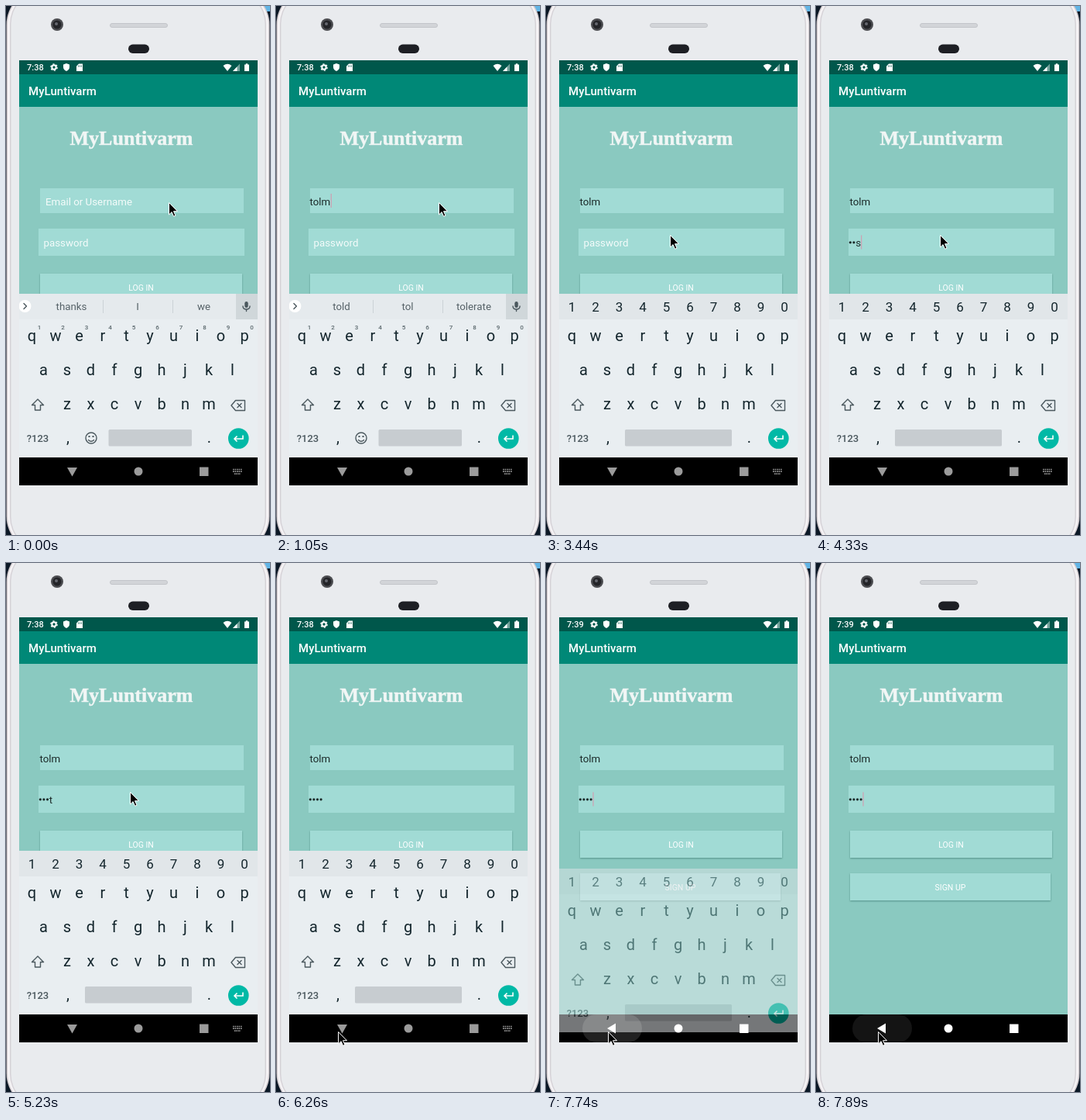
Recreate the animation shown at these times as an HTML page. Size 341 px wide and 682 px high, loop 8000 ms.

```html
<!DOCTYPE html>
<html lang="en">
<head>
<meta charset="utf-8">
<title>Login screen</title>
<style>
  html, body { margin: 0; width: 100%; height: 100%; overflow: hidden; background: #0b1826; }
  svg { display: block; width: 100%; height: 100%; font-family: Roboto, sans-serif; }
  .mid { text-anchor: middle; }
  .hint { font-size: 13.3px; fill: #f4fbfa; }
  .typed { font-size: 13.3px; fill: #1c2b2a; }
  .field { fill: #a1dbd5; }
  .button { fill: #a1dbd5; filter: drop-shadow(0 1px .8px rgba(0, 60, 50, .38)); }
  .label { font-size: 10.5px; fill: #fff; text-anchor: middle; }
  .caret { fill: #cf9fb1; }
  .key { font-size: 20px; fill: #14262d; }
  .digit { font-size: 17px; fill: #14262d; }
  .tiny { font-size: 8px; font-weight: 500; fill: #5b686d; }
  .word { font-size: 13.3px; fill: #566268; }
  .line { fill: none; stroke: #4b585e; stroke-width: 1.4; stroke-linejoin: round; stroke-linecap: round; }
</style>
</head>
<body>
<svg viewBox="0 0 341 682" preserveAspectRatio="none">
  <defs>
    <clipPath id="screenClip"><rect x="17" y="70" width="308" height="548"/></clipPath>
    <clipPath id="navClip"><rect x="17" y="582" width="308" height="36"/></clipPath>
  </defs>

  <!-- phone body -->
  <rect width="341" height="682" fill="#0b1826"/>
  <rect x="333" width="8" height="7" fill="#62b5e6"/>
  <rect x=".5" y="-22" width="340" height="726" rx="46" fill="#cfc8cc"/>
  <rect x="2" y="-21" width="337" height="724" rx="45" fill="#f5f3f5"/>
  <rect x="5" y="-19" width="331" height="720" rx="42" fill="#d5d2d7"/>
  <rect x="6.5" y="-18" width="328" height="718" rx="41" fill="#e9ebee"/>
  <circle cx="66" cy="24" r="8" fill="#4b4c50"/>
  <circle cx="66" cy="24" r="5.5" fill="#232428"/>
  <circle cx="65" cy="23" r="2" fill="#65676e"/>
  <rect x="134.5" y="22.5" width="74" height="5" rx="2.5" fill="#d2d4d8" stroke="#c3c5ca"/>
  <rect x="158" y="49.500" width="27" height="11.500" rx="5.700" fill="#1d1f24"/>

  <g clip-path="url(#screenClip)">
    <rect x="17" y="70" width="308" height="548" fill="#8ac9c0"/>
    <rect x="17" y="70" width="308" height="18" fill="#00574b"/>
    <rect x="17" y="88" width="308" height="42" fill="#008877"/>

    <!-- status bar -->
    <g fill="#fff">
      <text id="clock" x="27" y="83" font-size="11" font-weight="500"></text>
      <circle cx="62" cy="79" r="2.700" fill="none" stroke="#fff" stroke-width="2"/>
      <circle cx="62" cy="79" r="4.200" fill="none" stroke="#fff" stroke-width="1.300" stroke-dasharray="2.200"/>
      <path d="M78 74l4 1.600v3.200q0 3.600-4 5.200q-4-1.600-4-5.200v-3.200z"/>
      <path d="M94 74.500h5v9.500h-8v-6.500z"/>
      <path d="M93.500 76.500v2m2-2v2m2-2v2" stroke="#00574b" stroke-width=".8"/>
      <path d="M286 84l-5.500-7q5.500-4.600 11 0z"/>
      <path d="M302 74.500v9.500h-9z" opacity=".45"/>
      <path d="M298.500 78.200v5.800h-5.500z"/>
      <path d="M309.800 74.300h2.400v1.200h1.800v8.500h-6v-8.500h1.800z"/>
    </g>

    <!-- login form -->
    <text x="29" y="115" font-size="15" font-weight="500" fill="#fff">MyLuntivarm</text>
    <text class="mid" x="162" y="179" font-family="'Liberation Serif', serif" font-size="26" font-weight="700"
      fill="#f1f6f5" stroke="#f1f6f5" stroke-width=".5">MyLuntivarm</text>
    <rect class="field" x="44" y="235" width="263" height="32"/>
    <rect class="field" x="42" y="287" width="266" height="35"/>
    <rect class="button" x="44" y="345" width="261" height="35"/>
    <rect class="button" x="44" y="400" width="259" height="35"/>
    <text class="label" x="174.500" y="366.500">LOG IN</text>
    <text class="label" x="173.500" y="421.800">SIGN UP</text>
    <text id="userHint" class="hint" x="51" y="256.500">Email or Username</text>
    <text id="user" class="typed" x="43.500" y="256.500"></text>
    <text id="passHint" class="hint" x="48.500" y="309.800">password</text>
    <g id="dots" fill="#1c2b2a"></g>
    <text id="pass" class="typed" y="309.800"></text>
    <rect id="caret" class="caret" width="1.200" height="18"/>

    <rect x="17" y="582" width="308" height="36" fill="#000"/>

    <g id="keyboard">
      <rect x="17" y="371" width="308" height="211" fill="#e9eef1"/>
      <rect x="17" y="371" width="308" height="33" fill="#e1e6e9"/>
      <g id="keys"></g>
      <g id="suggestRow">
        <rect x="17" y="371" width="308" height="33" fill="#e5eaed"/>
        <rect x="297" y="371" width="28" height="33" fill="#d0d7da"/>
        <path d="M125.500 379v17m90-17v17" stroke="#cbd2d6"/>
        <circle cx="24.500" cy="387" r="8" fill="#fff"/>
        <path class="line" d="M23 383.500l3.500 3.500l-3.500 3.500"/>
        <rect x="308.300" y="381" width="4.400" height="8" rx="2.200" fill="#4b585e"/>
        <path class="line" d="M306 387q0 4 4.500 4q4.500 0 4.500-4m-4.500 4v2.500"/>
        <text class="word mid" x="84.500" y="392"></text>
        <text class="word mid" x="170" y="392"></text>
        <text class="word mid" x="255.500" y="392"></text>
      </g>
      <path class="line" d="M41 507l7.500 7.500h-4v6.500h-7v-6.500h-4z"/>
      <path class="line" d="M296.500 508.500h12v13h-12l-5.500-6.500zm2.500 4l5 5m0-5l-5 5"/>
      <text class="mid" x="41" y="562" font-size="13" font-weight="500" fill="#4b585e">?123</text>
      <text class="key mid" x="80" y="563">,</text>
      <text class="key mid" x="262.500" y="563">.</text>
      <g id="emoji">
        <circle class="line" cx="110" cy="557" r="7"/>
        <path class="line" d="M106.500 559.500q3.500 3.500 7 0"/>
        <path d="M106.500 554h2v2h-2zm5 0h2v2h-2z" fill="#4b585e"/>
      </g>
      <rect id="space" y="546" height="21.500" rx="1.500" fill="#c7ccd0"/>
      <circle cx="300.300" cy="557.500" r="13.300" fill="#00b9a6"/>
      <path d="M306 553.500v4.500h-11m3.500-3.500l-3.500 3.500l3.500 3.500" fill="none" stroke="#fff" stroke-width="1.600"/>
    </g>

    <!-- navigation bar -->
    <g clip-path="url(#navClip)"><rect id="ripple" y="582" height="36" rx="18" fill="#fff"/></g>
    <g id="nav">
      <path id="back"/>
      <circle cx="171" cy="600" r="5.500"/>
      <rect x="250" y="594.500" width="11.500" height="11.500"/>
      <path id="switcher" fill="none" stroke="#9b9b9b" stroke-width="1.600" stroke-dasharray="1.600 .9"
        d="M293 597.500h12m-12 2.600h12m-10 3h8"/>
    </g>
  </g>

  <path id="mouse" d="M0 0v15.500l3.600-3.400l2.500 5.700l2.400-1.100l-2.500-5.500h5z"
    fill="#000" stroke="#fff" stroke-width="1" stroke-linejoin="round"/>
</svg>
<script>
const LOOP = 8000, PITCH = 30.5;
const $ = id => document.getElementById(id);
const show = (id, on) => { $(id).style.display = on ? '' : 'none'; };
const attr = (id, values) => {
  for (const [name, value] of Object.entries(values)) $(id).setAttribute(name, value);
};
// Latest entry whose start time has passed
const at = (track, t) => track.reduce((value, [start, next]) => t >= start ? next : value, track[0][1]);

const row = (chars, x, y, style) => [...chars].map((c, i) =>
  `<text class="${style} mid" x="${x + PITCH * i}" y="${y}">${c}</text>`).join('');
$('keys').innerHTML =
  row('1234567890', 33.5, 394, 'digit') +
  row('qwertyuiop', 33.5, 431.8, 'key') +
  row('asdfghjkl', 48.5, 475.8, 'key') +
  row('zxcvbnm', 79, 519.8, 'key') +
  `<g id="tinyDigits">${row('1234567890', 43, 417, 'tiny')}</g>`;
$('dots').innerHTML = [0, 1, 2, 3].map(i =>
  `<circle cx="${44.3 + 4.6 * i}" cy="304.8" r="1.6"/>`).join('');
const dots = [...$('dots').children];
const words = [...$('suggestRow').querySelectorAll('text')];

const userTrack = [[0, ''], [450, 't'], [600, 'to'], [750, 'tol'], [1050, 'tolm']];
const suggestTrack = [
  [0, ['thanks', 'I', 'we']], [450, ['the', 't', 'tonight']], [600, ['too', 'to', 'tonight']],
  [750, ['told', 'tol', 'tolerate']], [1200, ['told me', 'tolm', 'tolerate']]
];
// [hidden characters, visible character]
const passTrack = [
  [0, [0, '']], [3890, [0, 't']], [4040, [1, 'e']], [4330, [2, 's']], [4780, [3, 't']], [6260, [4, '']]
];
const caretToggles = [150, 1640, 1940, 2390, 2840, 3440, 3890, 5230, 5680, 6260, 6710, 7300, 7740];
const mouseTrack = [
  [0, [210.5, 253.5]], [1490, [208, 254.5]], [1640, [203, 257.5]], [1940, [160.5, 295.5]],
  [5380, [157, 306]], [5530, [134, 378]], [5680, [82, 530]], [5820, [40, 660]],
  [5970, [54, 644]], [6110, [74, 612]], [6260, [80.5, 604.5]]
];
const rippleTrack = [
  [0, [64, 43, 0]], [7590, [64, 43, .12]], [7740, [47, 77, .13]], [7890, [47, 77, .08]]
];

function render(t) {
  const user = at(userTrack, t);
  const [hidden, last] = at(passTrack, t);
  const inPassword = t >= 1940, closing = t >= 7740;

  $('clock').textContent = t < 7150 ? '7:38' : '7:39';
  $('user').textContent = user;
  show('userHint', !user);
  show('passHint', !hidden && !last);
  dots.forEach((dot, i) => { dot.style.display = i < hidden ? '' : 'none'; });
  $('pass').textContent = last;
  $('pass').setAttribute('x', 42 + 4.6 * hidden);

  show('caret', caretToggles.filter(time => t >= time).length % 2);
  const caretX = inPassword
    ? 42 + 4.6 * hidden + (last && $('pass').getComputedTextLength())
    : 44 + (user && $('user').getComputedTextLength());
  attr('caret', { x: caretX, y: inPassword ? 295.5 : 242 });

  at(suggestTrack, t).forEach((word, i) => { words[i].textContent = word; });
  for (const id of ['suggestRow', 'tinyDigits', 'emoji']) show(id, !inPassword);
  attr('space', inPassword ? { x: 102, width: 138 } : { x: 132.5, width: 107.5 });
  show('keyboard', t < 7890);
  attr('keyboard', { opacity: closing ? .5 : 1, transform: `translate(0 ${closing ? 23 : 0})` });

  const [x, width, opacity] = at(rippleTrack, t);
  attr('ripple', { x, width, opacity });
  attr('nav', { fill: closing ? '#fff' : '#9b9b9b' });
  attr('back', { d: closing ? 'M79 600l11-6.500v13z' : 'M79 595h13l-6.500 11.500z' });
  show('switcher', !closing);
  attr('mouse', { transform: `translate(${at(mouseTrack, t)})` });
}

function tick() {
  render(performance.now() % LOOP);
  requestAnimationFrame(tick);
}
tick();
</script>
</body>
</html>
```
